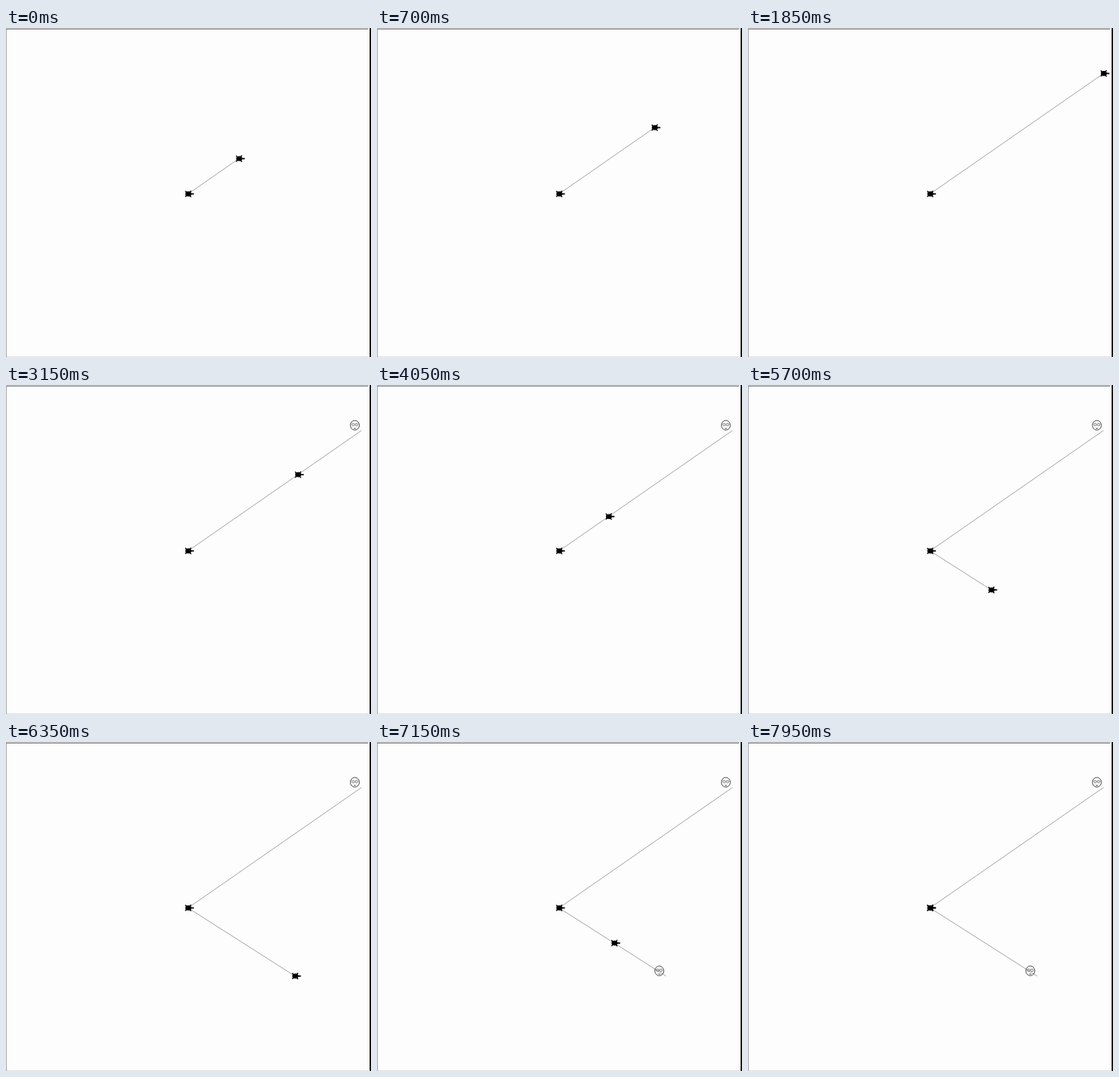
Recreate the animation shown at these times as an HTML page with a canvas. Size 486x437 px, loop 8 s.

```html
<!DOCTYPE html>
<html lang="en">
<head>
<meta charset="utf-8">
<title>Turtle walk</title>
<style>
  html, body { margin: 0; width: 100%; height: 100%; overflow: hidden; background: #fdfdfd; }
  canvas { display: block; }
</style>
</head>
<body>
<canvas id="stage" width="486" height="437"></canvas>
<script>
const ctx = document.getElementById('stage').getContext('2d');
const LOOP = 8000, STEP = 50;
const HOME = { x: 242.4, y: 220.4 };
const UPPER = { x: 473.4, y: 60.4 };
const LOWER = { x: 384.8, y: 310.9 };
const START = mix(HOME, UPPER, 0.293);

// The walk pauses at the end of each leg until the next one begins
const LEGS = [
  { begin: 0, end: 1850, from: START, to: UPPER, ease: 1.04 },
  { begin: 2200, end: 4790, from: UPPER, to: HOME },
  { begin: 4830, end: 6350, from: HOME, to: LOWER },
  { begin: 6400, end: 7950, from: LOWER, to: HOME }
];

function mix(a, b, k) {
  return { x: a.x + (b.x - a.x) * k, y: a.y + (b.y - a.y) * k };
}

function rect(color, x, y, w, h) {
  ctx.fillStyle = color;
  ctx.fillRect(x, y, w, h);
}

function line(a, b, width) {
  ctx.lineWidth = width;
  ctx.beginPath();
  ctx.moveTo(a.x, a.y);
  ctx.lineTo(b.x, b.y);
  ctx.stroke();
}

function oval(x, y, rx, ry) {
  ctx.beginPath();
  ctx.ellipse(x, y, rx, ry, 0, 0, 2 * Math.PI);
}

function turtle({ x, y }) {
  ctx.fillStyle = '#000';
  oval(x + 0.4, y, 4, 3.3);
  ctx.fill();
  line({ x, y }, { x: x + 7.8, y }, 1.8);
  for (const side of [-1, 1]) {
    line({ x: x - 3.7, y: y - side * 3.9 }, { x: x + 4.1, y: y + side * 4.2 }, 1.4);
  }
}

function face(end) {
  const x = end.x - 8.9, y = end.y - 6.9;
  ctx.lineWidth = 0.7;
  oval(x, y, 6, 6.4);
  ctx.stroke();
  ctx.lineWidth = 0.5;
  for (const side of [-1, 1]) {
    oval(x + side * 2.3, y - 0.9, 1.8, 1.6);
    ctx.stroke();
  }
  line({ x: x - 1.4, y: y + 4.2 }, { x: x + 1.4, y: y + 4.2 }, 0.7);
}

function frame() {
  rect('#fdfdfd', 0, 0, 486, 437);
  rect('#e3e3e3', 0, 436, 483, 1);
  rect('#a8a8a8', 0, 0, 1, 437);
  rect('#c8c8c8', 0, 0, 483, 1);
  rect('#808080', 0, 1, 482, 1);
  rect('#303030', 484, 0, 1, 437);
  rect('#000', 485, 0, 1, 437);
}

function draw(t) {
  const walked = LEGS.filter(leg => leg.begin <= t);
  const { begin, end, from, to, ease = 1 } = walked.at(-1);
  const progress = Math.min(1, (t - begin) / (end - begin));
  const walker = mix(from, to, progress ** ease);
  const [, upperBack, lowerOut, lowerBack] = walked;

  frame();
  ctx.strokeStyle = '#000';
  line(HOME, upperBack ? UPPER : walker, 0.36);
  if (lowerOut) line(HOME, lowerBack ? LOWER : walker, 0.36);
  if (upperBack) face(UPPER);
  if (lowerBack) face(LOWER);
  turtle(HOME);
  turtle(walker);
}

const start = performance.now();
function tick() {
  const t = (performance.now() - start) % LOOP;
  draw(Math.floor(t / STEP) * STEP);
  requestAnimationFrame(tick);
}
tick();
</script>
</body>
</html>
```
